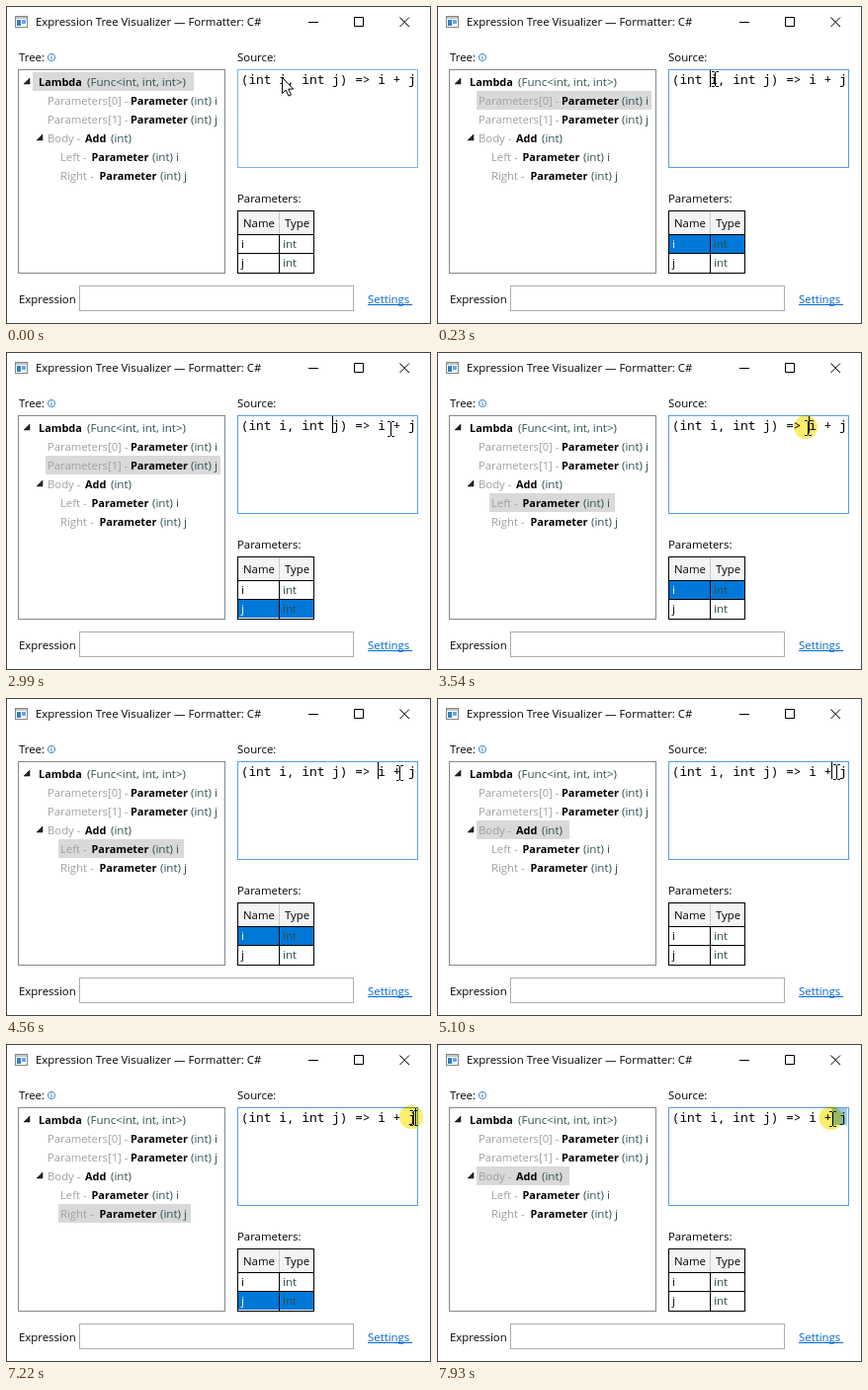
Animation, 430 px wide and 322 px high, one loop 8 s. Source, as an HTML page:

```html
<!DOCTYPE html>
<html lang="en">
<head>
<meta charset="utf-8">
<title>Expression Tree Visualizer</title>
<style>
  html, body { margin: 0; width: 100%; height: 100%; overflow: hidden; background: #fff; }
  svg { display: block; width: 430px; height: 322px; }
  text { font-family: "Open Sans", "Noto Sans", sans-serif; font-size: 11.4px; white-space: pre; }
  .bold { font-weight: 700; font-size: 10.9px; }
  .dim { fill: #a0a0a0; font-size: 11.3px; }
  .slate { fill: #2f4f4f; font-size: 11.6px; }
  .code { font-family: "Noto Sans Mono", "DejaVu Sans Mono", monospace; font-size: 12.83px; }
  .link { fill: #0066cc; }
  .halo { fill: #faee6c; mix-blend-mode: multiply; }
</style>
</head>
<body>
<svg id="stage" viewBox="0 0 430 322" xmlns="http://www.w3.org/2000/svg"></svg>
<script>
const LOOP = 8000, STEP = 80, BLINK = 530;
const COL0 = 237.7, COL_W = 7.7;      // monospaced columns in the code box
const ROW0 = 67, ROW_H = 18.96;       // tree rows
const colX = c => COL0 + COL_W * c;

const stage = document.getElementById('stage');

function add(tag, attrs, content) {
  const el = document.createElementNS('http://www.w3.org/2000/svg', tag);
  for (const k in attrs) el.setAttribute(k, attrs[k]);
  if (content) el.textContent = content;
  return stage.appendChild(el);
}
const set = (el, attrs) => { for (const k in attrs) el.setAttribute(k, attrs[k]); };
const show = (el, on) => el.setAttribute('visibility', on ? 'visible' : 'hidden');
const text = (x, y, str, cls = '') => add('text', { x, y, class: cls }, str);
const rect = (x, y, width, height, fill, stroke = 'none') =>
  add('rect', { x, y, width, height, fill, stroke });
const line = (d, stroke = '#000', width = 1) =>
  add('path', { d, stroke, fill: 'none', 'stroke-width': width });

// Window frame and title bar
rect(0.5, 0.5, 429, 321, '#fff', '#444');
rect(9.5, 10.5, 12, 11, '#fff', '#858585');
rect(10, 11, 11, 2, '#c4c4c4');
rect(11, 14, 4, 6, '#2f7fd0');
rect(16, 14, 4, 4, '#69a9e2');
text(30, 20, 'Expression Tree Visualizer — Formatter: C#');
line('M306 16.5h10');
line('M352.5 11.5h9v9h-9z');
line('M398.5 11.5l9.5 9.5m0 -9.5l-9.5 9.5');

// Tree
text(13, 56, 'Tree:');
add('circle', { cx: 46, cy: 52, r: 3.6, fill: '#fff', stroke: '#2b7cc4', 'stroke-width': 0.9 });
line('M46 49.6v1M46 51.2v3', '#2b7cc4');
rect(12.5, 64.5, 209, 206, '#fff', '#828790');
const treeMark = rect(0, 0, 0, ROW_H, '#d9d9d9');

// Each row: left and right edge of its mark, then text pieces as [x, string, class]
const rows = [
  [27, 190, [33, 'Lambda', 'bold'], [82, '(Func<int, int, int>)', 'slate']],
  [40, 217, [42, 'Parameters[0] - ', 'dim'], [126, 'Parameter', 'bold'], [187, '(int) i', 'slate']],
  [40, 217, [42, 'Parameters[1] - ', 'dim'], [126, 'Parameter', 'bold'], [187, '(int) j', 'slate']],
  [40, 134, [42, 'Body - ', 'dim'], [80, 'Add', 'bold'], [106, '(int)', 'slate']],
  [53, 180, [55, 'Left - ', 'dim'], [86.5, 'Parameter', 'bold'], [148, '(int) i', 'slate']],
  [53, 187, [55, 'Right - ', 'dim'], [94.5, 'Parameter', 'bold'], [156, '(int) j', 'slate']]
];
rows.forEach(([, , ...parts], i) =>
  parts.forEach(([x, str, cls]) => text(x, Math.round(ROW0 + ROW_H * i + 14), str, cls)));
for (const [x, y] of [[24, 73], [37, 130]])
  add('path', { d: `M${x} ${y}v6h-6z`, fill: '#262626', stroke: '#000', 'stroke-width': 0.5 });

// Code box
text(234, 56, 'Source:');
const codeBox = rect(234.5, 64.5, 182, 99, '#fff', '#569de5');
const selection = rect(0, 65, 0, 17, '#99c9ef');
text(COL0, 78.5, '(int i, int j) => i + j', 'code');
const caret = rect(0, 65, 1, 17, '#000');

// Parameter table
text(234, 199, 'Parameters:');
rect(234.5, 207.5, 77, 63, '#fff', '#000');
rect(235, 208, 76, 23, '#f3f4f6');
line('M276.5 208v23', '#c9c9c9');
text(240, 224, 'Name');
text(282, 224, 'Type');
const gridRows = ['i', 'j'].map((name, i) => {
  const mark = rect(235, 232 + 19 * i, 76, 18, '#0078d7');
  const label = text(238, 245 + 19 * i, name);
  text(280, 245 + 19 * i, 'int', 'slate');
  return { mark, label };
});
line('M235 231.5h76M235 250.5h76M276.5 231v39');

// Bottom bar
text(13, 301, 'Expression');
rect(74.5, 283.5, 277, 25, '#fff', '#abadb3');
text(366, 301, 'Settings', 'link');
line('M366 302.5h45', '#0066cc');

// Pointer
const halo = add('circle', { r: 12, class: 'halo' });
const beam = line('M-3.5 -7.5h2.5l1 1l1 -1h2.5M0 -7v14M-3.5 7.5h2.5l1 -1l1 1h2.5');
const arrow = add('path', {
  d: 'M279.5 72.5v16l3.6 -3.4l2.9 6l2.5 -1.2l-2.8 -5.8h5z',
  fill: '#fff', stroke: '#000', 'stroke-linejoin': 'round'
});

// Pointer moves: start time, number of steps, destination
const moves = [
  [620, 5, 327, 77], [1100, 3, 331, 77], [2030, 7, 370, 78], [2750, 4, 389, 77.5],
  [3220, 3, 375, 77], [3690, 6, 400, 76.5], [4320, 2, 398, 76], [4940, 5, 408, 75],
  [5420, 1, 409, 75], [6120, 2, 413, 75], [7220, 2, 411, 75], [7450, 5, 401, 76],
  [7930, 1, 400.5, 76]
];
function pointerAt(t) {
  let x = 281, y = 74;
  for (const [start, steps, tx, ty] of moves) {
    if (t < start) break;
    const k = Math.min(1, (Math.floor((t - start) / STEP) + 1) / steps);
    x += (tx - x) * k;
    y += (ty - y) * k;
  }
  return { x, y };
}

// Mouse button held: from, to
const presses = [[80, 230], [1650, 1800], [3540, 3690], [4710, 4790], [5730, 5960], [6900, LOOP]];
// Selected tree row and grid row (-1 for none) from a given time
const picks = [[0, 0, -1], [230, 1, 0], [1650, 2, 1], [3540, 4, 0], [4710, 3, -1], [5810, 5, 1]];
// Caret column from a given time, with the start of its blink
const carets = [[230, 5, 190], [1650, 12, 1690], [3540, 18, 3500], [4710, 20.95, 4730],
  [5810, 22, 5820], [6900, 23, 6900]];
const latest = (list, t) => list.filter(e => e[0] <= t).pop();

function textSelection(t, x) {
  if (t >= 80 && t < 230) return [0, 23];
  if (t >= 7220) return [Math.round((x - COL0) / COL_W), 23];
  return [0, 0];
}

function draw(t) {
  const p = pointerAt(t);
  const [from, to] = textSelection(t, p.x);
  let [, row, gridRow] = latest(picks, t);
  if (t >= 7220 && from < 22) { row = 3; gridRow = -1; }

  const [left, right] = rows[row];
  set(treeMark, { x: left, y: Math.round(ROW0 + ROW_H * row), width: right - left });
  gridRows.forEach(({ mark, label }, i) => {
    show(mark, i === gridRow);
    label.setAttribute('fill', i === gridRow ? '#fff' : '#000');
  });

  set(selection, { x: colX(from), width: (to - from) * COL_W });
  const c = latest(carets, t);
  const lit = c && from === to && Math.floor(Math.max(0, t - c[2]) / BLINK) % 2 === 0;
  show(caret, lit);
  if (c) caret.setAttribute('x', Math.floor(colX(c[1])));

  const hovering = t < 80;
  codeBox.setAttribute('stroke', hovering ? '#7eb4ea' : '#569de5');
  show(arrow, hovering);
  show(beam, !hovering);
  beam.setAttribute('transform', `translate(${Math.floor(p.x) + 0.5} ${Math.round(p.y)})`);
  show(halo, presses.some(([a, b]) => t >= a && t < b));
  set(halo, { cx: p.x - 2, cy: p.y - 1 });
}

const begin = performance.now();
function tick() {
  draw((performance.now() - begin) % LOOP);
  requestAnimationFrame(tick);
}
draw(0);
requestAnimationFrame(tick);
</script>
</body>
</html>
```
